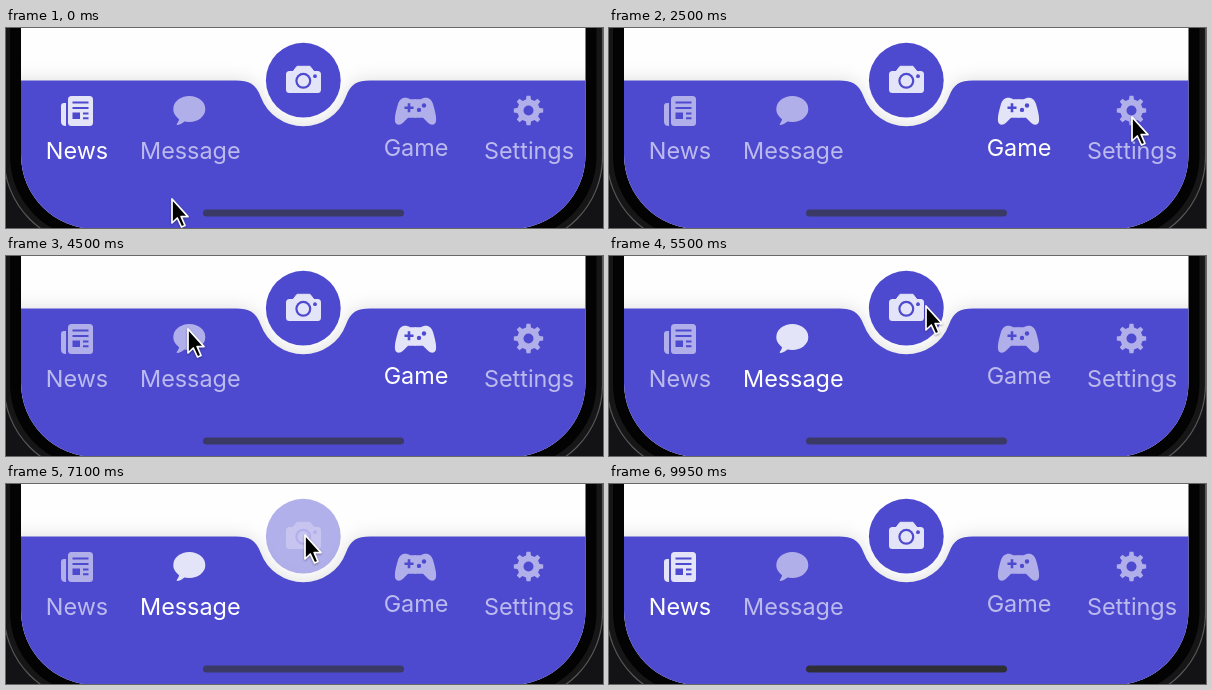
These frames come from a looping animation (597 by 200 pixels, 10 s). An HTML page:

```html
<!DOCTYPE html>
<html lang="en">
<head>
<meta charset="utf-8">
<title>Tab bar</title>
<style>
  html, body { margin: 0; width: 100%; height: 100%; overflow: hidden; background: #131214; }
  svg { display: block; width: 597px; height: 200px; }
  text { font: 400 23.4px Inter, Roboto, sans-serif; text-anchor: middle; fill: #fff; }
  .bar { fill: #4e4ad0; }
  .icon { fill: #fff; }
  .shade { filter: drop-shadow(0 0 9px rgba(0, 0, 0, .13)); }
</style>
</head>
<body>
<svg viewBox="0 0 597 200">
  <defs>
    <clipPath id="screen"><rect x="15" y="-200" width="564.5" height="401" rx="74"/></clipPath>
    <path id="grip" d="M410 71.300H404C400 68.500 394 69.500 392 76C390 83 388.500 88 389 93C389.500 97.500 394 97.800 397 94.800L402 89.800H410Z"/>
  </defs>

  <rect x="-2" y="-200" width="598.5" height="417" rx="88" fill="#161617" stroke="#58585b" stroke-width="1.2"/>
  <rect x="4" y="-200" width="586.5" height="411" rx="83" fill="#030303"/>

  <g clip-path="url(#screen)">
    <rect width="597" height="210" fill="#fefefe"/>
    <path class="bar shade" d="M-20 52.400H230C243 52.400 250 56 254.600 68.500A45.500 45.500 0 0 0 340 68.500C344.600 56 351 52.400 364 52.400H617V230H-20Z"/>

    <g id="camera">
      <circle class="bar" cx="297.3" cy="52.2" r="37.4"/>
      <g id="lens">
        <rect class="icon" x="280" y="43" width="35" height="22" rx="3.5"/>
        <path class="icon" d="M287 43.500L291 38.300H304L308 43.500Z" stroke="#fff" stroke-linejoin="round"/>
        <circle class="bar" cx="297.3" cy="52.8" r="8"/>
        <circle class="icon" cx="297.3" cy="52.8" r="5.8"/>
        <circle class="bar" cx="309" cy="48.2" r="1.9"/>
      </g>
    </g>

    <g class="tab">
      <g class="icon">
        <rect x="62" y="68" width="25" height="30" rx="3.5"/>
        <path d="M60 75V98Q55 98 55 93.500V78Q55 75 58 75Z"/>
        <path class="bar" d="M66.500 73.500h16v2h-16ZM66.500 79h16v2h-16ZM66.500 84.500h7.500v6.500h-7.500ZM77 84.500h5.500v2h-5.500ZM77 89.300h5.500v2h-5.500Z"/>
      </g>
      <text x="71" y="131">News</text>
    </g>
    <g class="tab">
      <g class="icon">
        <ellipse cx="183.3" cy="81" rx="16" ry="13"/>
        <path d="M173 89Q173.500 93 171 95.400Q170 97 171.500 97Q175.500 96.500 180 92Z"/>
      </g>
      <text x="184.3" y="131">Message</text>
    </g>
    <g class="tab">
      <g class="icon">
        <use href="#grip"/>
        <use href="#grip" transform="matrix(-1 0 0 1 819 0)"/>
        <path d="M398.500 79.800h9M403 75.300v9" stroke="#4e4ad0" stroke-width="2.600"/>
        <circle class="bar" cx="418" cy="77.5" r="2.2"/>
        <circle class="bar" cx="413" cy="81.9" r="2.2"/>
      </g>
      <text x="410" y="128">Game</text>
    </g>
    <g class="tab">
      <g class="icon">
        <path id="gear"/>
        <circle class="bar" cx="522.5" cy="82.5" r="5"/>
      </g>
      <text x="523" y="131">Settings</text>
    </g>

    <rect id="home" x="197" y="181.4" width="201" height="7.2" rx="3.6"/>
  </g>

  <g id="cursor">
    <path d="M1 1V25L6.300 20L10.500 29L14 27.500L10.200 18.600H17Z" stroke="#fff" stroke-width="1.700" stroke-linejoin="round" style="filter:drop-shadow(0 1px 1px rgba(0,0,0,.35))"/>
  </g>
</svg>

<script>
const LOOP = 10000, TRAVEL = 450, CLICK = 250;
const $ = id => document.getElementById(id);
const tabs = [...document.querySelectorAll('.tab')];

const spots = {
  start: [165, 170], news: [71, 85], message: [181, 72], game: [404, 88],
  settings: [522, 88], rim: [316, 49], camera: [298, 50], away: [130, 215]
};
const tabNames = ['news', 'message', 'game', 'settings'];

// the pointer's stops, each with its arrival time
const tour = [
  ['start', 0], ['message', 550], ['game', 1350], ['settings', 2350], ['game', 3500],
  ['message', 4500], ['rim', 5500], ['camera', 6000], ['message', 7950], ['news', 8700], ['away', 9500]
];

const mix = (a, b, u) => a + (b - a) * u;

function ramp(t, from, to) {
  const u = Math.min(1, Math.max(0, (t - from) / (to - from)));
  return u * u * (3 - 2 * u);
}

function pointer(t) {
  return tour.reduce((pos, [name, time]) => {
    const u = ramp(t, time - TRAVEL, time);
    return pos.map((v, i) => mix(v, spots[name][i], u));
  }, spots.start);
}

// a stop on a tab selects it shortly after arrival
function selected(t) {
  const done = tour.filter(([name, time]) => tabNames.includes(name) && time + CLICK <= t);
  return done.length ? tabNames.indexOf(done.pop()[0]) : 0;
}

function gearPath(cx, cy, teeth) {
  const corners = [[11.3, -.28], [14.8, -.17], [14.8, .17], [11.3, .28]];
  const pts = [];
  for (let i = 0; i < teeth; i++) {
    for (const [r, f] of corners) {
      const a = (i + f) * 2 * Math.PI / teeth;
      pts.push(`${cx + r * Math.sin(a)} ${cy - r * Math.cos(a)}`);
    }
  }
  return `M${pts.join('L')}Z`;
}

function draw(t) {
  const current = selected(t);
  tabs.forEach((tab, i) => {
    const [icon, label] = tab.children;
    icon.setAttribute('opacity', i === current ? .85 : .56);
    label.setAttribute('opacity', i === current ? 1 : .62);
  });

  const press = ramp(t, 6900, 7000) - ramp(t, 7550, 8050);
  $('camera').setAttribute('opacity', mix(1, .43, press));
  $('lens').setAttribute('opacity', mix(.85, .28, press));

  const dark = ramp(t, 9500, 9900);
  $('home').setAttribute('fill', `rgb(${mix(59, 46, dark)},${mix(57, 46, dark)},${mix(101, 54, dark)})`);
  $('cursor').setAttribute('transform', `translate(${pointer(t)})`);
}

$('gear').setAttribute('d', gearPath(522.5, 82.5, 8));

const start = performance.now();
function tick() {
  draw((performance.now() - start) % LOOP);
  requestAnimationFrame(tick);
}
tick();
</script>
</body>
</html>
```
